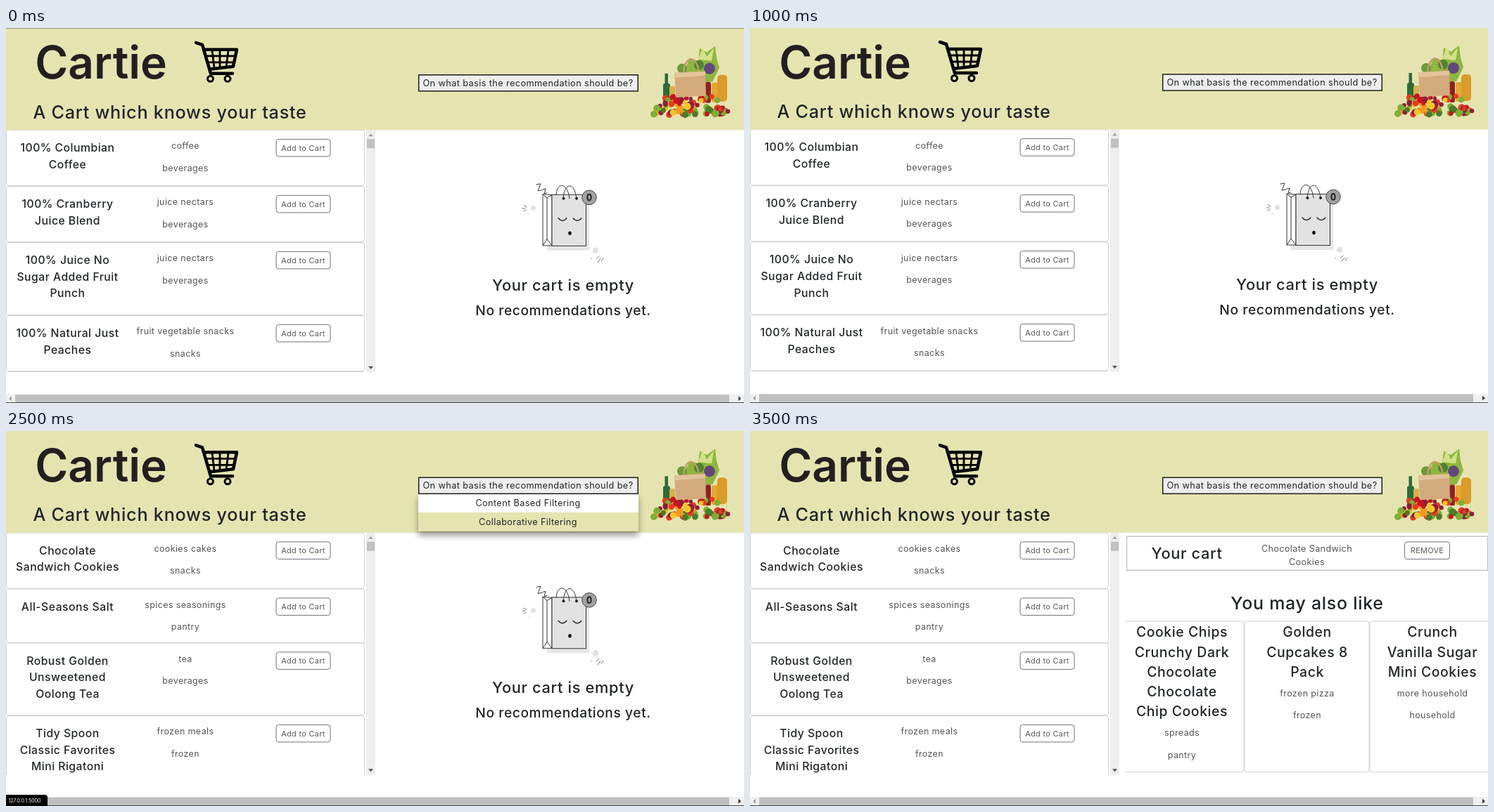
Recreate the animation shown at these times as an HTML page. Size 1049 px wide and 534 px high, loop 4000 ms.

```html
<!DOCTYPE html>
<html lang="en">
<head>
<meta charset="utf-8">
<title>Cartie</title>
<style>
  html, body { margin: 0; width: 100%; height: 100%; overflow: hidden; background: #fff; }
  svg { display: block; }
  text { font-family: Inter, sans-serif; letter-spacing: .03em; text-anchor: middle; fill: #212529; }
  .left { text-anchor: start; }
  .medium { font-weight: 500; }
  .brand { font-weight: 600; letter-spacing: 0; fill: #231f20; }
  .tag { fill: #555; }
  .menu { filter: drop-shadow(0 6px 5px rgba(0, 0, 0, .4)); }
  .line { fill: none; stroke: #333; stroke-width: 1; stroke-linecap: round; }
</style>
</head>
<body>
<svg id="stage" width="1049" height="534" viewBox="0 0 1049 534"></svg>
<script>
const KHAKI = '#e5e4b1';
const STEP = 500;

// Product rows: title lines, two tags, row height. Suggestions: title lines, tags.
const scenes = [
  {
    shift: 0,
    rows: [
      ['100% Columbian|Coffee', 'coffee', 'beverages', 80],
      ['100% Cranberry|Juice Blend', 'juice nectars', 'beverages', 80],
      ['100% Juice No|Sugar Added Fruit|Punch', 'juice nectars', 'beverages', 104],
      ['100% Natural Just|Peaches', 'fruit vegetable snacks', 'snacks', 80],
    ],
    bought: '100% Columbian Coffee',
    bottom: 453.5,
    likes: [
      ['Petite Dill|Pickles', 'pantry'],
      ['Peanut|Butter &amp;|Strawberry|Jam|Sandwich', 'frozen'],
      ['Peanut|Butter Bars', 'snacks'],
    ],
  },
  {
    shift: .3,
    rows: [
      ['Chocolate|Sandwich Cookies', 'cookies cakes', 'snacks', 80],
      ['All-Seasons Salt', 'spices seasonings', 'pantry', 77],
      ['Robust Golden|Unsweetened|Oolong Tea', 'tea', 'beverages', 103.5],
      ['Tidy Spoon|Classic Favorites|Mini Rigatoni', 'frozen meals', 'frozen', 104],
    ],
    bought: 'Chocolate Sandwich|Cookies',
    bottom: 485.5,
    likes: [
      ['Cookie Chips|Crunchy Dark|Chocolate|Chocolate|Chip Cookies', 'spreads', 'pantry'],
      ['Golden|Cupcakes 8|Pack', 'frozen pizza', 'frozen'],
      ['Crunch|Vanilla Sugar|Mini Cookies', 'more household', 'household'],
    ],
  },
];

// y is the vertical middle of the capitals of the first line.
const text = (lines, x, y, size, cls = '', gap = 0) => lines.split('|').map((line, i) =>
  `<text class="${cls}" x="${x}" y="${y + i * gap + size * .36}" font-size="${size}">${line}</text>`).join('');
const box = (x, y, w, h, fill = '#fff', stroke = 'none', r = 0, weight = 1) =>
  `<rect x="${x}" y="${y}" width="${w}" height="${h}" rx="${r}" fill="${fill}" stroke="${stroke}" stroke-width="${weight}"/>`;
const disc = (x, y, r, fill, extra = '') => `<circle cx="${x}" cy="${y}" r="${r}" fill="${fill}" ${extra}/>`;
const path = (d, attrs = 'class="line"') => `<path d="${d}" ${attrs}/>`;
const button = (label, x, y, w) =>
  box(x, y, w, 24.5, '#fff', '#6c757d', 3.5) + text(label, x + w / 2, y + 12.2, 10.9, 'tag');

function trolley() {
  return path('M270 20L279 23L291 64H322M281 30L328 30L323 54L289 58',
      'fill="none" stroke="#000" stroke-width="4.5" stroke-linejoin="round" stroke-linecap="round"') +
    path('M293 31L296 56M304 31V56M316 31L313 55M284 39H325M287 48H323',
      'fill="none" stroke="#000" stroke-width="2.8"') +
    [290.5, 315].map(x => disc(x, 71.5, 4, 'none', 'stroke="#000" stroke-width="3"')).join('');
}

function groceries() {
  let seed = 7;
  const random = () => (seed = seed * 16807 % 2147483647) / 2147483647;
  const fruit = ['#c4161c', '#e23b22', '#f29a1f', '#f4c62c', '#7fae35', '#4d7a2a', '#8c1f3a'];
  let out = path('M964 60L972 42L984 46L986 28L996 34L1008 25L1010 42L1014 56L1004 76H966Z', 'fill="#8fb63f"') +
    path('M984 44L990 27L996 40L1006 28L1003 46Z', 'fill="#d5e08a"') +
    disc(1000, 57, 8, '#63477a') + disc(985, 52, 7, '#4f8432') + disc(961, 57, 7, '#6a9b3a') +
    box(934, 78, 10, 28, '#2f6a3a', 'none', 3) + box(936.5, 64, 4.5, 16, '#2f6a3a') +
    box(943, 82, 8, 22, '#d8b04a', 'none', 2) + box(994, 76, 8, 30, '#8e2222', 'none', 3) +
    box(1003, 77, 9, 28, '#e5a72f', 'none', 3) + box(1011, 66, 14, 38, '#d99b2b', 'none', 5);
  for (let i = 0; i < 85; i++) {
    const y = 97 + 26 * random();
    const half = 34 + (y - 96) * .95;
    const x = 974 + (random() * 2 - 1) * Math.min(half, 56);
    out += disc(x.toFixed(1), y.toFixed(1), (2.8 + 2.6 * random()).toFixed(1), fruit[Math.floor(random() * 7)]);
  }
  return out + path('M963 64C964 37 983 37 985 64', 'fill="none" stroke="#c79a6b" stroke-width="2.5"') +
    path('M950 63L994 61L995 96L952 98Z', 'fill="#d3aa7c"') +
    path('M950 63L994 61V67L951 70Z', 'fill="#e3c39b"');
}

function header(open) {
  let out = box(0, -2, 1049, 146.6, KHAKI) + text('Cartie', 135, 48.5, 64, 'brand') + trolley() +
    text('A Cart which knows your taste', 233, 119, 25.2, 'medium') + groceries();
  if (open) {
    out += `<g class="menu">${box(586, 89, 313, 53.5, KHAKI)}</g>` + box(586, 89, 313, 26.5) +
      text('Content Based Filtering', 742, 102.5, 12.7) + text('Collaborative Filtering', 742, 129, 12.7);
  }
  return out + box(586.7, 66, 311.6, 23, '#eee', '#1c1c1c', 0, 1.5) +
    text('On what basis the recommendation should be?', 742, 77.3, 12.75);
}

function productList(rows) {
  let y = 144.7;
  const cards = rows.map(([title, kind, aisle, height]) => {
    const card = box(.5, y, 509, height - .8, '#fff', '#cfcfcf', 3.5) +
      text(title, 87.5, y + 25, 15.75, 'medium', 23.6) +
      text(kind, 255, y + 22.3, 12.5, 'tag') + text(aisle, 255, y + 53.7, 12.5, 'tag') +
      button('Add to Cart', 384, y + 12.9, 77);
    y += height;
    return card;
  }).join('');
  return `<g clip-path="url(#list)">${cards}${box(.5, y, 509, 20, '#fff', '#cfcfcf', 3.5)}</g>` +
    box(512, 144.6, 13, 345, '#eeeeee') + box(513, 157.5, 11, 13, '#c1c1c1') +
    path('M515 153.5h7l-3.5-4z', 'fill="#a3a3a3"') + path('M515 481h7l-3.5 4z', 'fill="#505050"');
}

function emptyCart() {
  return box(769, 243, 60, 73, '#e6e6e6') +
    path('M763 236L776 237V309H763Z', 'fill="#fff" stroke="#333"') +
    box(776, 236.5, 48.5, 73, '#e2e2e2', '#333') +
    path('M763 236L769 241L776 237M769 241V300M763 309L769 300L776 309') +
    path('M782 237C783 218 798 218 801 242M792 242C794 218 808 218 811 242') +
    disc(792.5, 242, 2, '#222') + disc(811, 242, 2, '#222') +
    path('M785 270Q791 277 797 270M806 270Q812 277 818 270', 'class="line" style="stroke-width:1.4"') +
    '<ellipse cx="801.5" cy="291.5" rx="2.3" ry="2.7" fill="#111"/>' +
    disc(829, 240.5, 10.3, '#a2a2a2', 'stroke="#444"') + 
    '<ellipse cx="829" cy="240.3" rx="2.6" ry="4.4" fill="none" stroke="#222" stroke-width="2"/>' +
    path('M754 222L760 221L756 231L762 230M763 229L767 228L765 235L769 234') +
    path('M736 252L740 254M734 256H738M736 260L739 258M839 328L843 324M841 333L845 327M846 331L849 327',
      'class="line" style="stroke:#777"') +
    disc(749.5, 255.5, 3.6, '#e2e2e2') + disc(743, 264, 1.1, '#ddd') +
    disc(838, 316, 4.3, '#e2e2e2') + disc(832, 327.5, 1.6, '#ddd') +
    text('Your cart is empty', 792, 365, 21.8, 'medium') +
    text('No recommendations yet.', 792, 401, 19.2, 'medium');
}

function filledCart({ bought, likes, bottom }) {
  const cards = likes.map(([title, ...tags], i) => {
    const x = 614 + i * 178;
    const end = 286 + 28.3 * (title.split('|').length - 1);
    return box(x - 89, 270.5, 177, bottom - 270.5, '#fff', '#cfcfcf', 3.5) +
      text(title, x, 286, 19.4, 'medium', 28.3) + text(tags.join('|'), x, end + 30.3, 12.5, 'tag', 31.5);
  }).join('');
  return box(535.5, 149.8, 513, 48.2, '#fff', '#c8c8cc', 0, 1.6) +
    text('Your cart', 621, 174, 21.8, 'medium') + text(bought, 791.5, 167, 12.6, 'tag', 19) +
    button('REMOVE', 930.5, 157.6, 64) +
    text('You may also like', 792, 245, 24.9, 'medium') +
    `<g clip-path="url(#likes)">${cards}</g>`;
}

function bottomBar() {
  return box(0, 520.7, 1049, 13, '#f0f0f0') + box(13, 521.4, 1015, 11.2, '#bfbfbf') +
    path('M8 523.5v7l-4-3.5z', 'fill="#a3a3a3"') + path('M1041 523.5v7l4-3.5z', 'fill="#404040"');
}

function draw(phase) {
  const scene = scenes[phase >> 2];
  const step = phase % 4;   // idle, menu open, menu closed, item added
  const shift = step ? scene.shift : .8;
  return `<clipPath id="list"><rect y="140" width="511" height="349.7"/></clipPath>
    <clipPath id="likes"><rect x="534" y="260" width="515" height="240"/></clipPath>
    <g transform="translate(0 ${shift})">` +
    productList(scene.rows) + (step === 3 ? filledCart(scene) : emptyCart()) +
    header(step === 1) + bottomBar() + '</g>' +
    (step ? '' : box(0, 0, 1049, 1, '#8f8f7c')) + box(0, 533, 1049, 1, '#444') +
    (step === 1 ? path('M0 518H55Q59 518 59 522V534H0Z', 'fill="#000"') +
      '<text class="left" x="3.5" y="529" font-size="7" style="fill:#fff;letter-spacing:0">127.0.0.1:5000</text>' : '');
}

const stage = document.getElementById('stage');
let shown = -1;
function tick(now) {
  const phase = Math.floor(now / STEP) % 8;
  if (phase !== shown) stage.innerHTML = draw(shown = phase);
  requestAnimationFrame(tick);
}
tick(performance.now());
</script>
</body>
</html>
```
